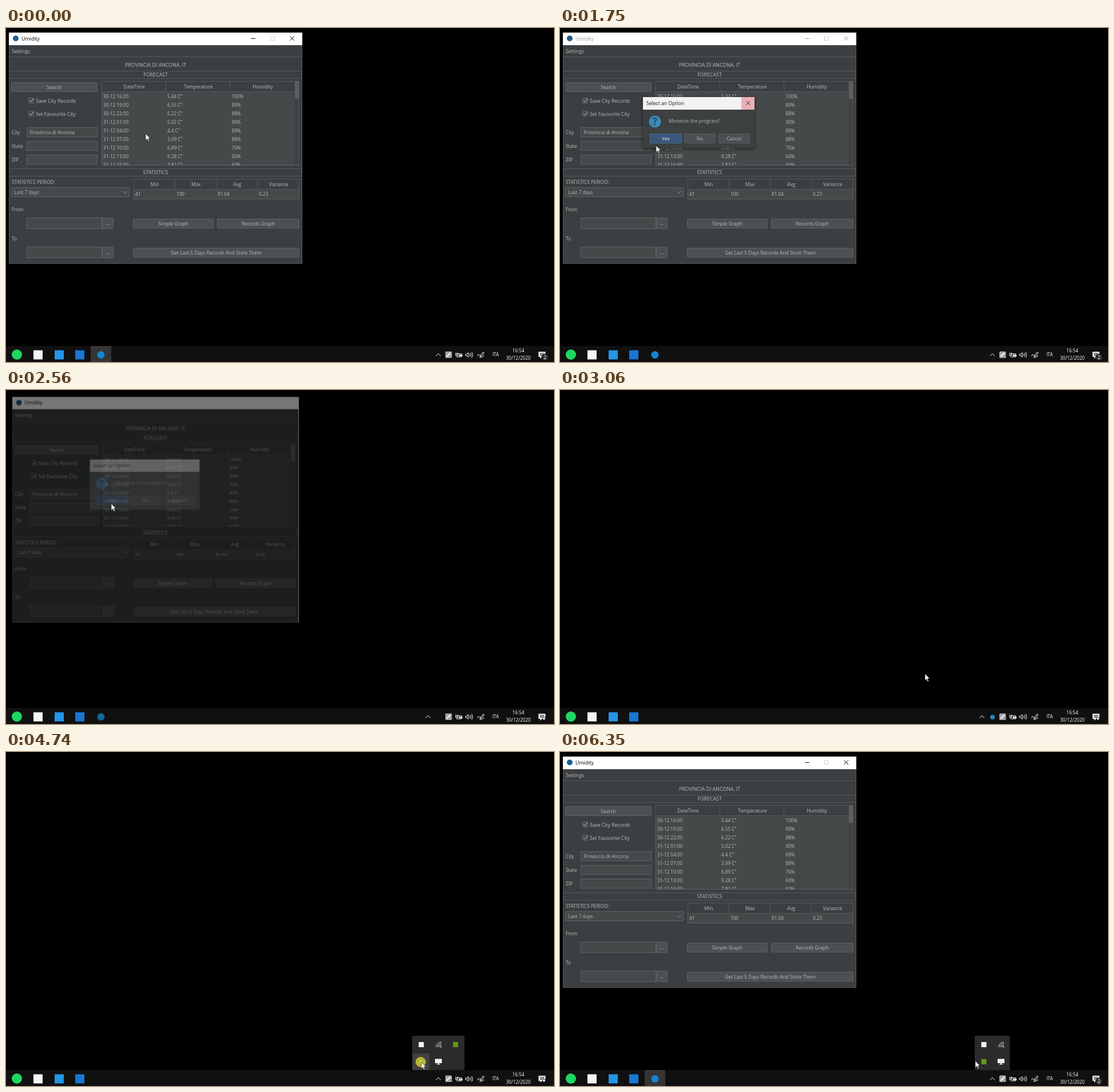
Recreate the animation shown at these times as an HTML page. Size 958 by 585 pixels, loop 6730 ms.

```html
<!DOCTYPE html>
<html lang="en">
<head>
<meta charset="utf-8">
<title>Minimize to tray</title>
<style>
html, body { margin: 0; width: 100%; height: 100%; overflow: hidden; background: #000; }
svg { display: block; width: 958px; height: 585px; }
text { font: 8.4px "Open Sans", "Noto Sans", sans-serif; fill: #bbb; }
.mid { text-anchor: middle; }
.head { font-size: 8.8px; }
.menu, .field { font-size: 8.65px; }
.cell { font-size: 8.15px; }
.clock { font-size: 8.1px; fill: #fff; }
.line { stroke: #55585a; fill: none; }
.glyph { stroke: #fff; fill: none; }
.hover { fill: #414141; }

#app, #title, .controls, #content, #dialog, #dialogX, #closeHot, #task, #taskHot, #badge,
#chevron, #chevronHot, #trayDrop, #fly1, #fly2, #hotDrop, #hotScreen, #hotCard, #cursor, #click {
  animation: 6730ms linear infinite;
}
#title, .controls, #content, #closeHot, #taskHot, #badge, #chevron, #chevronHot,
#fly2, #hotDrop, #hotScreen, #hotCard, #click { animation-timing-function: step-end; }

#app { animation-name: app; transform-origin: 261.5px 210.5px; }
@keyframes app {
  0%, 36.85% { opacity: 1; transform: none; }
  38.04% { opacity: .47; transform: translate(-.5px, -1px) scale(.975); }
  39.23% { opacity: 0; transform: translate(-1px, -2px) scale(.95); }
  83.3% { opacity: 0; transform: scale(.92); animation-timing-function: ease-out; }
  85.3%, 100% { opacity: 1; transform: none; }
}
#title { animation-name: title; }
@keyframes title { 0%, 100% { color: #000; } 23.8% { color: #999; } 36.85% { color: #000; } }
.controls { animation-name: controls; }
@keyframes controls { 0%, 100% { opacity: 1; } 36.85% { opacity: 0; } 83.3% { opacity: 1; } }
#content { animation-name: content; }
@keyframes content { 0%, 100% { opacity: 1; } 83% { opacity: 0; } 86.9% { opacity: 1; } }
#closeHot { animation-name: closeHot; }
@keyframes closeHot { 0%, 100% { opacity: 0; } 15.6% { opacity: 1; } 20.8% { opacity: 0; } }

/* While closing, the dialog blends so the window text stays on top. */
#dialog { animation-name: dialog; transform-origin: 242.5px 165.5px; }
@keyframes dialog {
  0%, 23.9% { opacity: 0; transform: scale(.94); animation-timing-function: ease-out; }
  26% { opacity: .93; transform: none; }
  27.2%, 36.85% { opacity: 1; transform: none; mix-blend-mode: normal; }
  36.9% { mix-blend-mode: screen; }
  38.04% { opacity: .3; transform: scale(.983); mix-blend-mode: screen; }
  39.23%, 99.9% { opacity: 0; transform: scale(.96); mix-blend-mode: screen; }
  100% { opacity: 0; transform: scale(.96); mix-blend-mode: normal; }
}
#dialogX { animation-name: dialogX; }
@keyframes dialogX { 0%, 23.9% { opacity: .6; } 26% { opacity: .3; } 27.3%, 100% { opacity: 0; } }

#task { animation-name: task; }
@keyframes task {
  0%, 36.85% { opacity: 1; }
  38.04% { opacity: .75; }
  40%, 86.9% { opacity: 0; }
  87.7%, 100% { opacity: 1; }
}
#taskHot { animation-name: taskHot; }
@keyframes taskHot { 0%, 100% { opacity: 1; } 23.8% { opacity: 0; } 87.2% { opacity: 1; } }
#badge { animation-name: badge; }
@keyframes badge { 0%, 100% { opacity: 1; } 36.85% { opacity: 0; } 87.7% { opacity: 1; } }
#chevron { animation-name: chevron; }
@keyframes chevron {
  0%, 100% { transform: none; }
  36.85% { transform: translateX(-18px); }
  58% { transform: none; }
}
#chevronHot { animation-name: chevronHot; }
@keyframes chevronHot { 0%, 100% { opacity: 0; } 55% { opacity: 1; } 58% { opacity: 0; } }
#trayDrop { animation-name: trayDrop; }
@keyframes trayDrop { 0%, 39% { opacity: 0; } 40%, 57.9% { opacity: 1; } 58%, 100% { opacity: 0; } }

#fly1 { animation-name: fly1; }
@keyframes fly1 {
  0%, 58.5% { opacity: 0; transform: translateY(14px); animation-timing-function: ease-out; }
  61%, 84.6% { opacity: 1; transform: none; }
  84.61%, 100% { opacity: 0; transform: none; }
}
#fly2 { animation-name: fly2; }
@keyframes fly2 { 0% { opacity: 0; } 84.6%, 100% { opacity: 1; } }
#hotDrop { animation-name: hotDrop; }
@keyframes hotDrop { 0%, 100% { opacity: 0; } 69% { opacity: 1; } }
#hotScreen { animation-name: hotScreen; }
@keyframes hotScreen { 0%, 100% { opacity: 0; } 84.6% { opacity: 1; } 86.2% { opacity: 0; } }
#hotCard { animation-name: hotCard; }
@keyframes hotCard { 0%, 100% { opacity: 0; } 86.2% { opacity: 1; } 94.3% { opacity: 0; } }

#cursor { animation-name: cursor; }
@keyframes cursor {
  0%, 7.6% { transform: translate(244px, 185px); animation-timing-function: ease-in-out; }
  17%, 19.8% { transform: translate(500px, 17px); animation-timing-function: ease-in-out; }
  25.6%, 28% { transform: translate(168px, 206px); animation-timing-function: ease-out; }
  31.1%, 38.6% { transform: translate(184px, 199px); animation-timing-function: cubic-bezier(.5, 0, .7, .8); }
  44% { transform: translate(606px, 452px); }
  45.4%, 46.5% { transform: translate(638px, 497px); animation-timing-function: ease-out; }
  54% { transform: translate(727px, 564px); }
  55.7%, 59.4% { transform: translate(738px, 571px); animation-timing-function: ease-in; }
  63.6%, 65% { transform: translate(705px, 531px); }
  66.5%, 67% { transform: translate(678px, 507px); animation-timing-function: ease-out; }
  69.9%, 77.6% { transform: translate(726px, 543px); }
  79.2%, 85.7% { transform: translate(729px, 544px); }
  89%, 100% { transform: translate(726px, 541px); }
}
#click { animation-name: click; }
@keyframes click {
  0%, 100% { opacity: 0; }
  17.1% { opacity: .65; } 19.2% { opacity: 0; }
  31.2% { opacity: .65; } 34.2% { opacity: 0; }
  55.8% { opacity: .65; } 57.5% { opacity: 0; }
  70.3% { opacity: .65; } 72.3% { opacity: 0; }
  73.1% { opacity: .65; } 75% { opacity: 0; }
}
</style>
</head>
<body>
<svg viewBox="0 0 958 585">
  <defs>
    <clipPath id="rowsClip"><rect x="167" y="112" width="338" height="128.5"/></clipPath>
    <filter id="shade" x="-10%" y="-10%" width="120%" height="130%">
      <feDropShadow dx="0" dy="2" stdDeviation="3" flood-opacity=".55"/>
    </filter>
    <rect id="shield" x="-4.5" y="-5" width="9" height="9" fill="#f2f2f2"/>
    <g id="wifi" class="glyph">
      <path d="M-5 4A9 9 0 0 1 4-5M-2.5 4A6.5 6.5 0 0 1 4-2.5M0 4A4 4 0 0 1 4 0" stroke="#ddd"/>
      <circle cx="3.3" cy="3.3" r="1.1" fill="#fff" stroke="none"/>
    </g>
    <rect id="card" x="-4.5" y="-4.5" width="9" height="9" fill="#5f9a14"/>
    <path id="screen" d="M-6-4.5H6V3H1V4.5H3V5.5H-3V4.5H-1V3H-6Z" fill="#f4f4f4"/>
  </defs>
  <rect width="958" height="585"/>

  <g id="app">
    <rect x="5" y="8" width="513" height="405" fill="#fff"/>
    <g id="content">
      <rect x="5" y="30" width="513" height="383" fill="#3c3f41"/>
      <path class="line" d="M5 50.5H518M6 75.5H517V88.5H6ZM6 246.5H517V259.5H6Z" stroke="#515456"/>
      <g id="form"></g>
      <g id="rows" clip-path="url(#rowsClip)"></g>
      <rect x="5.5" y="30.5" width="512" height="382" class="line" stroke="#4b4e50"/>
    </g>
    <g id="title">
      <circle cx="17" cy="18.3" r="5" fill="#1b5f92"/>
      <text x="27" y="21.5" class="head" style="fill:currentColor">Umidity</text>
      <g class="controls" fill="none" stroke="currentColor">
        <path d="M428.5 18.5H436M496.5 14.5L504 22M504 14.5L496.5 22"/>
        <rect x="462.5" y="15" width="6.5" height="6.5" stroke="#d0d0d0"/>
      </g>
      <g id="closeHot">
        <rect x="483" y="8" width="35" height="22" fill="#e81123"/>
        <path class="glyph" d="M496.5 14.5L504 22M504 14.5L496.5 22"/>
      </g>
    </g>
  </g>

  <g id="dialog">
    <g filter="url(#shade)">
      <rect x="145" y="121" width="195" height="89" fill="#3c3f41"/>
      <rect x="145" y="121" width="195" height="22" fill="#fff"/>
    </g>
    <rect id="dialogX" x="317" y="121" width="23" height="22" fill="#e81123"/>
    <path class="controls" d="M325.5 128L332.5 135M332.5 128L325.5 135" stroke="#222" fill="none"/>
    <text x="151" y="135" class="menu" style="fill:#111">Select an Option</text>
    <circle cx="166" cy="164" r="10.5" fill="#3592c4"/>
    <text x="166" y="170" class="mid" style="font-size:17px;font-weight:700;fill:#3c3f41">?</text>
    <text x="190" y="166">Minimize the program?</text>
    <g id="answers"></g>
  </g>

  <g id="fly1">
    <rect x="710" y="497" width="91.5" height="60" fill="#2b2b2b"/>
    <rect id="hotDrop" class="hover" x="711" y="528" width="29" height="29"/>
    <use href="#shield" x="726" y="513"/>
    <use href="#wifi" x="757" y="513"/>
    <use href="#card" x="786" y="512.5"/>
    <circle cx="725.5" cy="543" r="4" fill="#2b86c5"/>
    <use href="#screen" x="756" y="542"/>
  </g>
  <g id="fly2">
    <rect x="725" y="497" width="61.5" height="60" fill="#2b2b2b"/>
    <rect id="hotScreen" class="hover" x="757" y="528" width="29" height="29"/>
    <rect id="hotCard" class="hover" x="727" y="528" width="28" height="28"/>
    <use href="#shield" x="741" y="513"/>
    <use href="#wifi" x="772" y="513"/>
    <use href="#card" x="741" y="542.5"/>
    <use href="#screen" x="771" y="542"/>
  </g>

  <rect y="557" width="958" height="28" fill="#101010"/>
  <rect id="taskHot" x="148" y="557" width="36" height="28" fill="#353535"/>
  <circle cx="19" cy="572" r="9" fill="#1ed760"/>
  <rect x="48" y="564.5" width="16" height="16" fill="#f5f5f5"/>
  <rect x="85" y="564.5" width="16" height="16" fill="#2496e8"/>
  <rect x="121" y="564.5" width="16" height="16" fill="#1877d2"/>
  <circle id="task" cx="166" cy="572.5" r="6.5" fill="#1585d0"/>

  <rect id="chevronHot" x="729" y="557" width="18" height="28" fill="#2a2a2a"/>
  <path id="chevron" class="glyph" d="M751.5 574.5L755.7 570.3L760 574.5"/>
  <circle id="trayDrop" cx="756" cy="573" r="4" fill="#2b86c5"/>
  <rect x="768" y="566.5" width="11.5" height="11.5" rx="1.5" fill="#a5a5a5"/>
  <path d="M770.5 575.5L777 569" stroke="#fff" stroke-width="2"/>
  <path class="glyph" d="M788.5 570.5H796.5V576H789M797.5 572V575M786.5 568.5V570.5M789.5 568.5V570.5M786 571H790V573.5H786ZM788 574V576.5"/>
  <rect x="792" y="572" width="3.5" height="3" fill="#fff"/>
  <g class="glyph">
    <path d="M803.5 571H805.5L808 568.5V576.5L805.5 574H803.5Z"/>
    <path d="M810 570.5Q811.5 572.5 810 574.5M812 569Q814.5 572.5 812 576M814 567.5Q817.5 572.5 814 577.5" stroke-width=".9"/>
    <path d="M825 575Q824 571 827.5 572.5T828 577Q831 578 836 574M829 574L834 567.5L836 569L831 575Z"/>
  </g>
  <text x="856" y="575.2" class="mid clock">ITA</text>
  <text x="895.7" y="568.3" class="mid clock">16:54</text>
  <text x="895.7" y="581.3" class="mid clock">30/12/2020</text>
  <path d="M931 567H943V576H937L934 579V576H931Z" fill="#fff"/>
  <path d="M933 569.5H941M933 571.5H941M933 573.5H938" stroke="#101010" stroke-width=".9"/>
  <circle cx="940.5" cy="575.5" r="2.5" fill="#fff" stroke="#101010"/>
  <g id="badge">
    <circle cx="942.3" cy="577" r="6" fill="#303030" stroke="#101010"/>
    <text x="942.3" y="580" class="mid clock">2</text>
  </g>

  <g id="cursor">
    <circle id="click" cx="-1" cy="0" r="9" fill="#ffee22"/>
    <path d="M0 0V11.7L2.7 9.2L4.5 13.5L6.5 12.6L4.7 8.5H8.3Z" fill="#fff" stroke="#000" stroke-width=".6"/>
  </g>
</svg>
<script>
const ns = 'http://www.w3.org/2000/svg';
let parent;
const into = id => { parent = document.getElementById(id); };

function add(tag, attrs, content = '') {
  const el = document.createElementNS(ns, tag);
  for (const key in attrs) el.setAttribute(key, attrs[key]);
  el.textContent = content;
  parent.append(el);
  return el;
}
const label = (x, y, str, cls = '') => add('text', { x, y: y + 3, class: cls }, str);
const box = (x, y, right, bottom, fill, stroke = '#5e6162', rx = 0) =>
  add('rect', { x: x + .5, y: y + .5, width: right - x - 1, height: bottom - y - 1, fill, stroke, rx });
const path = (d, stroke = '#55585a') => add('path', { d, stroke, fill: 'none' });
const field = (x, y, right, bottom) => box(x, y, right, bottom, '#45494a', '#606364');
function button(x, y, right, bottom, str, fill = '#4c5052', stroke = '#5e6162') {
  box(x, y, right, bottom, fill, stroke, 1.5);
  return label((x + right) / 2, (y + bottom) / 2 + .3, str, 'mid');
}

into('form');
label(10, 41, 'Settings', 'menu');
label(261.5, 64.8, 'PROVINCIA DI ANCONA, IT', 'mid head');
label(261.5, 82, 'FORECAST', 'mid head');
label(261.5, 252.8, 'STATISTICS', 'mid head');
button(9, 95, 160, 112, 'Search');
[['Save City Records', 127.5], ['Set Favourite City', 150.7]].forEach(([str, y]) => {
  box(39, y - 5.5, 49, y + 4.5, '#43494a', '#6b6b6b', 1);
  path(`M41 ${y - .5}L43.5 ${y + 2}L48 ${y - 4}`, '#ccc');
  label(52, y + .3, str, 'menu');
});
['City', 'State', 'ZIP'].forEach((str, i) => {
  const y = 174 + i * 24;
  label(10, y + 9, str);
  field(36, y, 160, y + 17);
});
label(41.5, 183, 'Provincia di Ancona', 'field');

box(167, 93, 513, 241, '#45494a');
box(167, 93, 505, 112, '#3c3f41', '#55585a');
path('M279.5 93V112M391.5 93V112');
add('rect', { x: 504, y: 94, width: 8.5, height: 146, fill: '#3f4345' });
add('rect', { x: 505, y: 94, width: 7, height: 30, fill: '#5c6062' });
['DateTime', 'Temperature', 'Humidity'].forEach((str, i) => label(224 + i * 112.5, 103, str, 'mid'));

label(10, 270, 'STATISTICS PERIOD:');
box(9, 279, 216, 296, '#45494a', '#606364', 1.5);
label(14.5, 288, 'Last 7 days');
path('M204.5 286L208 289.5L211.5 286', '#999');
box(223, 264, 513, 300, '#45494a');
box(223, 264, 513, 283, '#3c3f41', '#55585a');
path('M295.5 264V283M367.5 264V283M439.5 264V283');
['Min 41', 'Max 100', 'Avg 81.04', 'Variance 0.23'].forEach((pair, i) => {
  const [name, value] = pair.split(' ');
  label(260 + i * 72.2, 273.7, name, 'mid');
  label(226 + i * 72, 291, value, 'cell');
});

[['From', 317], ['To', 368]].forEach(([str, y]) => {
  label(10, y + .5, str);
  field(36, y + 15, 168, y + 35);
  button(168, y + 15, 188, y + 35, '...');
});
button(222, 334, 363, 351, 'Simple Graph');
button(369, 334, 513, 351, 'Records Graph');
button(222, 385, 513, 402, 'Get Last 5 Days Records And Store Them');

into('rows');
const temps = [5.44, 6.55, 6.22, 5.02, 4.4, 3.99, 6.89, 9.28, 7.82];
const humidity = [100, 89, 88, 90, 89, 88, 76, 60, 60];
temps.forEach((temp, i) => {
  const y = 120.2 + i * 15, hour = 16 + i * 3;
  const day = hour < 24 ? 30 : 31;
  label(170, y, `${day}-12 ${String(hour % 24).padStart(2, '0')}:00`, 'cell');
  label(282, y, `${temp} C°`, 'cell');
  label(394.5, y, `${humidity[i]}%`, 'cell');
});

into('answers');
button(157, 185, 213, 202, 'Yes', '#365880', '#4c708c').style.fontWeight = 700;
button(217, 185, 272, 202, 'No');
button(277, 185, 332, 202, 'Cancel');
</script>
</body>
</html>
```
